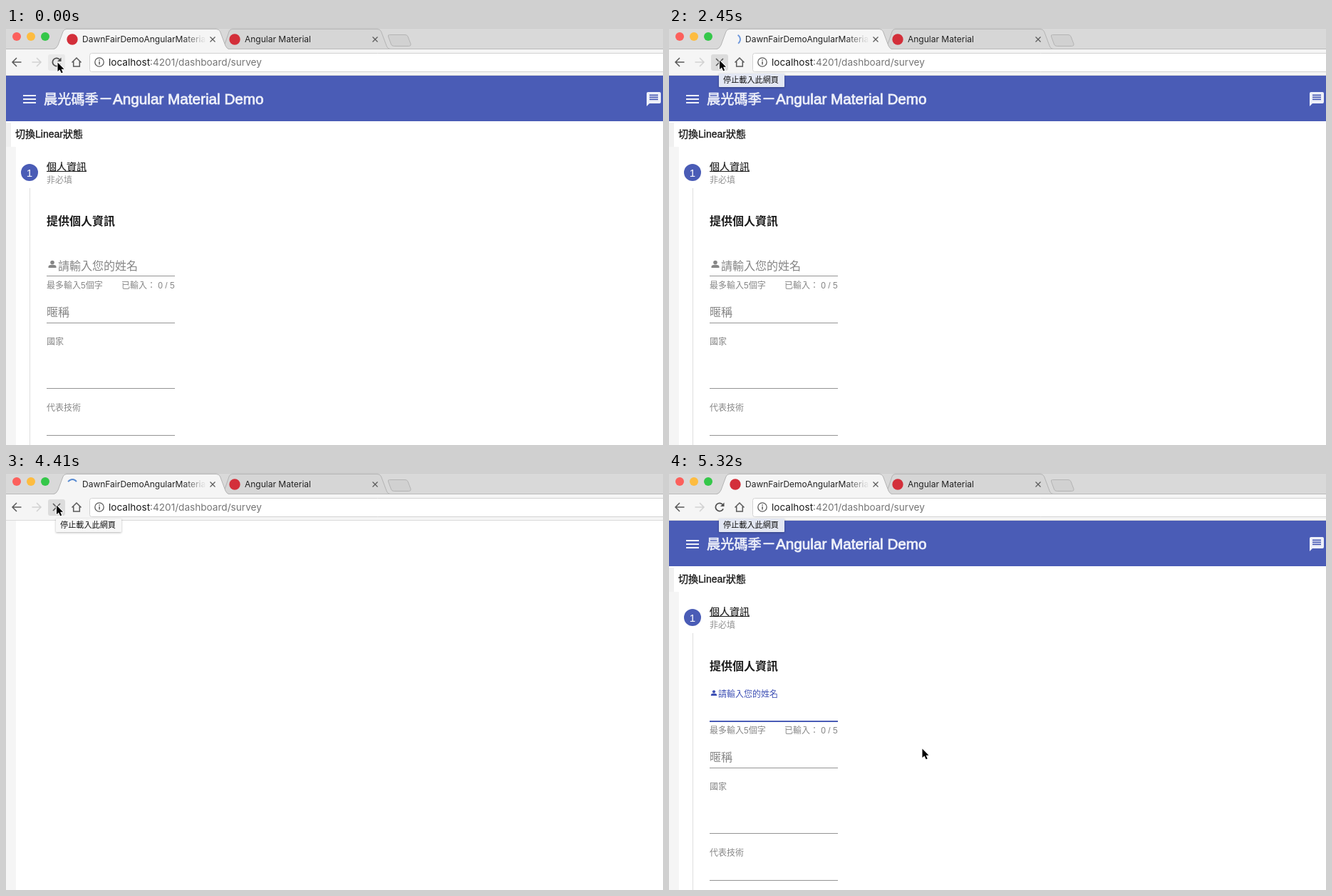
An HTML page with a canvas for the animation above (5.39 s loop, 922 px wide and 586 px high).

```html
<!DOCTYPE html>
<html lang="zh-Hant">
<head>
<meta charset="utf-8">
<title>Page reload</title>
<style>
html, body { margin: 0; width: 100%; height: 100%; overflow: hidden; background: #fff; }
canvas { display: block; }
</style>
</head>
<body>
<canvas id="stage" width="922" height="586"></canvas>
<script>
const c = document.getElementById('stage').getContext('2d');
const LOOP = 5390, FRAME = 70;
const RELOAD = 840, TOOLTIP = 2450, BLANK = 3150, LOADED = 4480, LEAVE = 4870, ARRIVE = 5250;
const FOCUS = LOADED - 18;
const BLUE = '#4a5cb6', INK = '#1c1c1c', GREY = '#868686', RED = '#d32f3a';
const CJK = '"Noto Sans CJK TC", "Noto Sans CJK JP", "Noto Sans CJK", sans-serif';
const PAGE = '"Liberation Sans", ' + CJK;
const UI = 'Inter, ' + CJK;
const ARROW = 'M0 0V14L3.300 11L5.700 16.500L8 15.500L5.700 10.200H10Z';

const clamp = v => Math.max(0, Math.min(1, v));
const mix = (a, b, p) => a + (b - a) * p;
const rad = deg => deg * Math.PI / 180;

// cubic-bezier(.25, .8, .25, 1)
function swift(x) {
  let lo = 0, hi = 1, u = .5;
  for (let i = 0; i < 20; i++) {
    u = (lo + hi) / 2;
    const bx = .75 * u * (1 - u) + u ** 3;
    if (bx < x) lo = u; else hi = u;
  }
  return 2.4 * u * (1 - u) ** 2 + 3 * u * u * (1 - u) + u ** 3;
}

function rect(x, y, w, h, color) {
  c.fillStyle = color;
  c.fillRect(x, y, w, h);
}

function box(x, y, w, h, r, fill, stroke) {
  c.beginPath();
  c.roundRect(x, y, w, h, r);
  c.fillStyle = fill;
  c.fill();
  if (stroke) { c.lineWidth = 1; c.strokeStyle = stroke; c.stroke(); }
}

function disc(x, y, r, color) {
  c.beginPath();
  c.arc(x, y, r, 0, 7);
  c.fillStyle = color;
  c.fill();
}

function path(d, stroke, width = 1, fill) {
  const p = new Path2D(d);
  if (fill) { c.fillStyle = fill; c.fill(p); }
  if (stroke) { c.strokeStyle = stroke; c.lineWidth = width; c.stroke(p); }
}

// Text centred vertically on cy, on a whole-pixel baseline; "heavy" thickens the strokes.
function text(s, x, cy, size, color, family = PAGE, weight = 400, heavy = 0) {
  c.font = `${weight} ${size}px ${family}`;
  c.fillStyle = c.strokeStyle = color;
  const y = Math.round(cy + size * .37);
  c.fillText(s, x, y);
  if (heavy) { c.lineWidth = heavy; c.strokeText(s, x, y); }
}

function cross(x, y, r, color, width) {
  path(`M${x - r} ${y - r}l${2 * r} ${2 * r}M${x + r} ${y - r}l${-2 * r} ${2 * r}`, color, width);
}

function spinner(t) {
  const turn = t < 3115 ? 225 - (t - 3080) * .2105 : 225 + (t - BLANK) * .3214;
  c.beginPath();
  c.arc(93, 16, 7, rad(turn - 57), rad(turn + 57));
  c.strokeStyle = t < 3000 ? '#7099dc' : '#588bd2';
  c.lineWidth = 2;
  c.stroke();
}

function tabs(t) {
  rect(0, 0, 922, 30, '#d9d9d9');
  rect(0, 0, 922, 1, '#cdcdcd');
  ['#fc605c', '#fdbc40', '#34c749'].forEach((color, i) => disc(15 + 20 * i, 12, 6, color));

  path('M300 29.5Q305 28 308 20L313 5Q314 1.5 318 1.5H521Q525 1.5 526.500 5L534 25Q535.500 29.500 540 29.500', '#b4b4b4', 1, '#d6d6d6');
  path('M536.500 12Q535.500 9.500 538.500 9.500H560Q563 9.500 564 12L568 22.500Q568.500 25.500 565.500 25.500H544.500Q541.500 25.500 540.500 23Z', '#b4b4b4', 1, '#d1d1d1');
  rect(0, 29, 922, 1, '#bababa');
  path('M66 30Q71 29 73 24L80 5Q81.500 1.500 85 1.500H295Q299 1.500 300.500 5L308 25Q310 29.500 314 30', '#b4b4b4', 1, '#f5f5f5');

  if (t >= RELOAD && t < LOADED) spinner(t); else disc(93, 16, 7.7, RED);
  disc(321, 16, 7.7, RED);

  const fade = c.createLinearGradient(248, 0, 281, 0);
  fade.addColorStop(0, '#222');
  fade.addColorStop(1, 'rgba(34,34,34,0)');
  c.save();
  c.beginPath();
  c.rect(100, 2, 181, 26);
  c.clip();
  text('DawnFairDemoAngularMaterial', 107, 15.7, 12, fade, UI);
  c.restore();
  text('Angular Material', 335, 15.7, 12, '#222', UI);
  cross(290, 16, 3.5, '#5a5a5a', 1.2);
  cross(518, 16, 3.5, '#5a5a5a', 1.2);
}

function reloadButton(t) {
  const loading = t >= RELOAD && t < LOADED;
  if (t < LOADED) box(59, 37, 24, 23, 3, loading ? '#dcdcdc' : '#e9e9e9');
  if (loading) return cross(71, 48, 5, '#5a5a5a', 1.6);
  if (t >= LOADED && t < LEAVE + FRAME) return cross(71, 48, 5, '#d4d4d4', 1.6);
  c.beginPath();
  c.arc(71, 48, 5.6, rad(25), rad(318));
  c.strokeStyle = '#505050';
  c.lineWidth = 1.7;
  c.stroke();
  path('M77.500 41.500V47H72Z', null, 1, '#505050');
}

function toolbar(t) {
  rect(0, 30, 922, 37, '#f5f5f5');
  rect(0, 66, 922, 1, '#dadada');
  path('M21.500 48H9M15 42L9 48L15 54', '#5a5a5a', 1.5);
  path('M36.500 48H49M43 42L49 48L43 54', '#d2d2d2', 1.5);
  reloadButton(t);
  path('M92.500 48.500L99 42L105.500 48.500M94.700 47V54H103.300V47', '#5a5a5a', 1.5);
  box(117.5, 35.5, 820, 26, 3, '#fff', '#d2d2d2');
  c.beginPath();
  c.arc(131, 48, 6.2, 0, 7);
  c.strokeStyle = '#5c5c5c';
  c.lineWidth = 1.3;
  c.stroke();
  rect(130.3, 47, 1.5, 4.5, '#5c5c5c');
  rect(130.3, 44.4, 1.5, 1.5, '#5c5c5c');
  text('localhost', 144, 48.3, 13.6, '#1a1a1a', UI);
  text(':4201/dashboard/survey', 144 + c.measureText('localhost').width, 48.3, 13.6, '#757575', UI);
}

function nameField(t) {
  const active = t >= LOADED;
  const p = active ? swift(clamp((t - FOCUS) / 400)) : 0;
  const tone = `rgb(${mix(134, 63, p)},${mix(134, 81, p)},${mix(134, 181, p)})`;
  c.save();
  c.translate(57, mix(334, 310.7, p));
  c.scale(1 - p / 4, 1 - p / 4);
  disc(8, -4.5, 2.8, tone);
  path('M2.500 3V1.500C2.500 -1 6 -1.300 8 -1.300S13.500 -1 13.500 1.500V3Z', null, 1, tone);
  text('請輸入您的姓名', 16, 0, 16, tone);
  c.restore();
  rect(57, 348, 180, 1, '#949494');
  if (!active) return;
  const w = 180 * mix(.5, 1, swift(clamp((t - FOCUS) / 300)));
  rect(147 - w / 2, 348, w, 2, BLUE);
  if (t < 4970) rect(57, 323, 1, 19, '#222');
}

function page(t) {
  rect(0, 67, 922, 64, BLUE);
  [94, 99, 104].forEach(y => rect(24, y, 18, 2, '#f0f2fa'));
  text('晨光碼季', 53, 100, 19.2, '#eef0f9', PAGE, 500, .6);
  text('－', 130, 100, 20, '#eef0f9', PAGE, 500, .6);
  text('Angular Material Demo', 150, 99.7, 20.7, '#eef0f9', PAGE, 400, .8);
  path('M901 90H917Q919 90 919 92V104Q919 106 917 106H903L899 110V92Q899 90 901 90Z', null, 1, '#eef0f9');
  [93, 96, 99].forEach(y => rect(903, y + .5, 12, 1.7, BLUE));

  rect(0, 133, 7, 34, '#f0f0f0');
  rect(0, 167, 14, 419, '#f5f5f5');
  text('切換Linear狀態', 13, 149, 14, INK, PAGE, 500, .35);

  disc(33, 203, 12, BLUE);
  c.textAlign = 'center';
  text('1', 33, 203, 15, '#fff');
  c.textAlign = 'left';
  rect(33, 225, 1, 361, '#dedede');
  text('個人資訊', 57, 195, 14, INK, PAGE, 500, .2);
  rect(57, 201, 56, 1, INK);
  text('非必填', 57, 213.5, 12, '#929292');
  text('提供個人資訊', 57, 271, 16, INK, PAGE, 700);

  nameField(t);
  text('最多輸入5個字', 57, 361.7, 12, GREY);
  text('已輸入： 0 / 5', 162, 361.7, 12, GREY);
  text('暱稱', 57, 399, 16, GREY);
  text('國家', 57, 441, 12, GREY);
  text('代表技術', 57, 534, 12, GREY);
  [414, 506, 572].forEach(y => rect(57, y, 180, 1, '#949494'));
}

function tooltip(blank) {
  c.save();
  c.shadowColor = 'rgba(0,0,0,.3)';
  c.shadowBlur = 3;
  c.shadowOffsetY = 1;
  box(70, 64, 92, 19, 1, blank ? '#f7f7f7' : '#e3e7f3');
  c.restore();
  text('停止載入此網頁', 76, 73, 11.15, '#111', CJK, 500);
}

function cursor(t) {
  const click = clamp((t - RELOAD + 280) / 280);
  const u = clamp((t - LEAVE) / (ARRIVE - LEAVE));
  const p = u * u * (3 - 2 * u);
  c.save();
  c.translate(mix(mix(72.5, 71, click), 355.5, p), mix(mix(48.5, 45.5, click), 387.5, p));
  c.scale(.9, .9);
  c.lineJoin = 'round';
  path(ARROW, '#fff', 2);
  path(ARROW, null, 1, '#000');
  c.restore();
}

function draw(now) {
  const t = Math.floor(now % LOOP / FRAME) * FRAME;
  const blank = t >= BLANK && t < LOADED;
  rect(0, 0, 922, 586, '#fff');
  tabs(t);
  toolbar(t);
  if (blank) rect(0, 67, 14, 519, '#f5f5f5'); else page(t);
  if (t >= TOOLTIP) tooltip(blank);
  cursor(t);
  requestAnimationFrame(draw);
}
requestAnimationFrame(draw);
</script>
</body>
</html>
```
